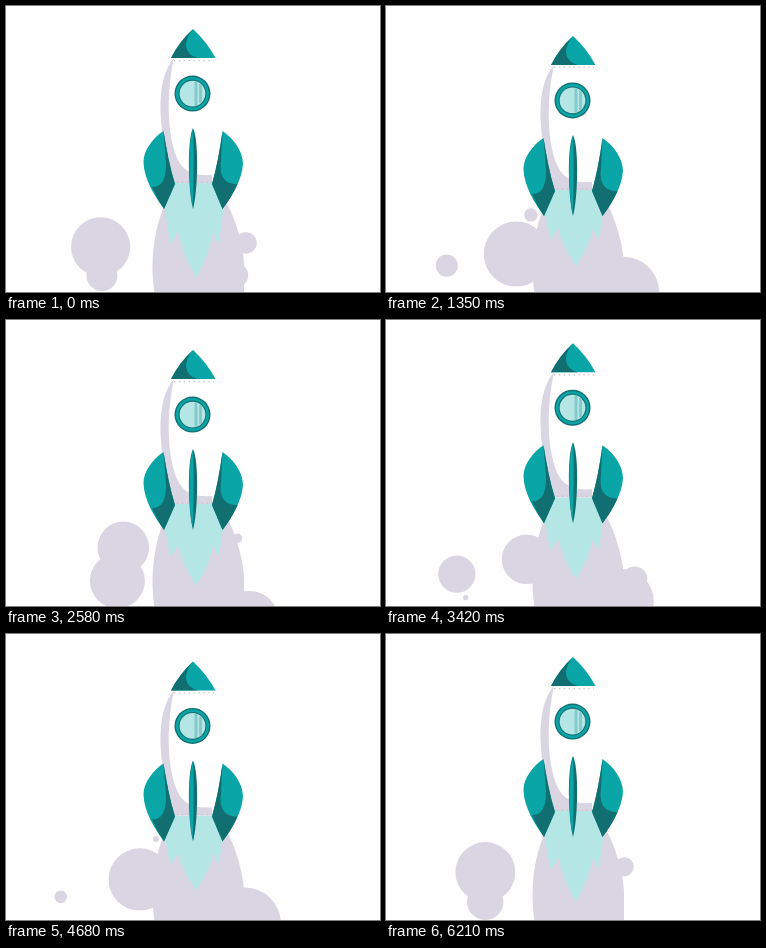
These frames come from a looping animation (374x286 px, 6240 ms). An HTML page:

```html
<!DOCTYPE html>
<html lang="en">
<head>
<meta charset="utf-8">
<title>Rocket</title>
<style>
  html, body { margin: 0; width: 100%; height: 100%; overflow: hidden; background: #fefefe; }
  svg { display: block; width: 374px; height: 286px; }
  .teal { fill: #0aa5a7; }
  .dark { fill: #126f71; }
  .pale { fill: #b3e6e5; }
  .smoke { fill: #d9d5e2; }
  .stripe { fill: none; stroke: #84c9ca; stroke-width: 2.8; }
  .rivets { fill: none; stroke: #c3c3cc; stroke-width: 1.3; stroke-dasharray: 1.3 3.6; }
</style>
</head>
<body>
<svg viewBox="0 0 374 286">
  <path class="smoke" d="M149 290C142 250 150 210 168 180H206C224 190 237 235 238 258V290Z"/>
  <path id="puffs" class="smoke"/>
  <g id="rocket">
    <path id="flame" class="pale" d="M159 0H217Q219 30 212 62L207 48Q203 72 190 95Q177 72 172 48L165 62Q157 30 159 0Z"/>
    <path fill="#fefefe" d="M167 52H208C222 88 219 138 206 177H168C154 138 151 88 167 52Z"/>
    <path class="smoke" d="M168 52C150 72 150 120 168 177H206V169C188 170 177 166 171 152C160 126 161 83 168 52Z"/>
    <path class="rivets" d="M168 54.5H208M171 176H206"/>

    <path class="teal" d="M187 23Q201 36 209.5 52H165Q173 36 187 23Z"/>
    <path class="dark" d="M187 23Q173 36 165 52H192Q181 49 180 40Q180 31 187 23Z"/>

    <circle class="dark" cx="186.5" cy="87.5" r="18"/>
    <circle class="teal" cx="186.5" cy="87.5" r="16.6"/>
    <circle class="dark" cx="186.5" cy="87.5" r="14"/>
    <circle class="pale" cx="186.5" cy="87.5" r="12.9"/>
    <path class="stripe" d="M190 75.500V99.500M194.500 78V97"/>

    <path class="teal" d="M157.500 125C147 132 137.500 144 137.500 156C138 174 149 190 158 203L169 178C164 162 160.500 144 157.500 125Z"/>
    <path class="dark" d="M157.500 125C160.500 144 164 162 169 178L158 203Q151 193 146 181C156 181 160 173 160 158Z"/>
    <path class="teal" d="M216.500 125C227 132 237 145 237 158C236 174 226 190 216.500 203L206 178C210.500 162 214 144 216.500 125Z"/>
    <path class="dark" d="M216.500 125C214 144 210.500 162 206 178L216.500 203Q226 191 231.500 178C219 178 213 171 215 155Z"/>

    <path class="dark" d="M187 122C193 134 192 184 187 203C182 184 181 134 187 122Z"/>
    <path class="teal" d="M187 123C188 140 188 180 186.500 200C182.500 182 182 136 187 123Z"/>
  </g>
</svg>
<script>
const LOOP = 6240, STEP = 30, LIFE = 700, FLICKER = 240;
const BEATS = 11, BEAT = LOOP / BEATS, TURN = 2 * Math.PI;
const byId = id => document.getElementById(id);
const rocket = byId('rocket'), flame = byId('flame'), puffs = byId('puffs');

// Puffs leave (x, y), drift by (dx, dy) and swell to size before shrinking;
// fall bends the drift, swell shifts the moment of the largest size
const streams = [
  { delay: 120, x: 155, y: 200, dx: -110, dy: 68, fall: .85, size: 30, swell: 1 },
  { delay: 0, x: 150, y: 225, dx: -75, dy: 55, fall: .65, size: 33, swell: .6 },
  { delay: 190, x: 222, y: 202, dx: 40, dy: 95, fall: 1.25, size: 13, swell: 1.4 },
  { delay: 440, x: 228, y: 264, dx: 24, dy: 56, fall: 1, size: 36, swell: .85 }
];

const wave = turns => (1 - Math.cos(TURN * turns)) / 2;

function circle(x, y, r) {
  return `M${x - r} ${y}a${r} ${r} 0 1 1 ${2 * r} 0a${r} ${r} 0 1 1 ${-2 * r} 0Z`;
}

function puff(s, age) {
  const r = s.size * Math.sin(Math.PI * age ** s.swell) ** 1.2;
  return circle(s.x + s.dx * age, s.y + s.dy * age ** s.fall, r);
}

function smoke(t) {
  let d = '';
  for (const s of streams) {
    for (let i = 0; i < BEATS; i++) {
      // One puff per beat, slightly early or late
      const born = s.delay + BEAT * i + 75 * Math.cos(TURN * i / BEATS);
      const age = ((t - born + 2 * LOOP) % LOOP) / LIFE;
      if (age < 1) d += puff(s, age);
    }
  }
  return d;
}

function draw(t) {
  const flare = (1 - wave(t / FLICKER)) ** 1.6;
  rocket.setAttribute('transform', `translate(0 ${7.5 * wave(t / BEAT + .03)})`);
  flame.setAttribute('transform', `translate(0 177) scale(1 ${.79 + .21 * flare})`);
  puffs.setAttribute('d', smoke(t));
}

const start = performance.now();
function tick() {
  const t = (performance.now() - start) % LOOP;
  draw(Math.floor(t / STEP) * STEP);
  requestAnimationFrame(tick);
}
tick();
</script>
</body>
</html>
```
